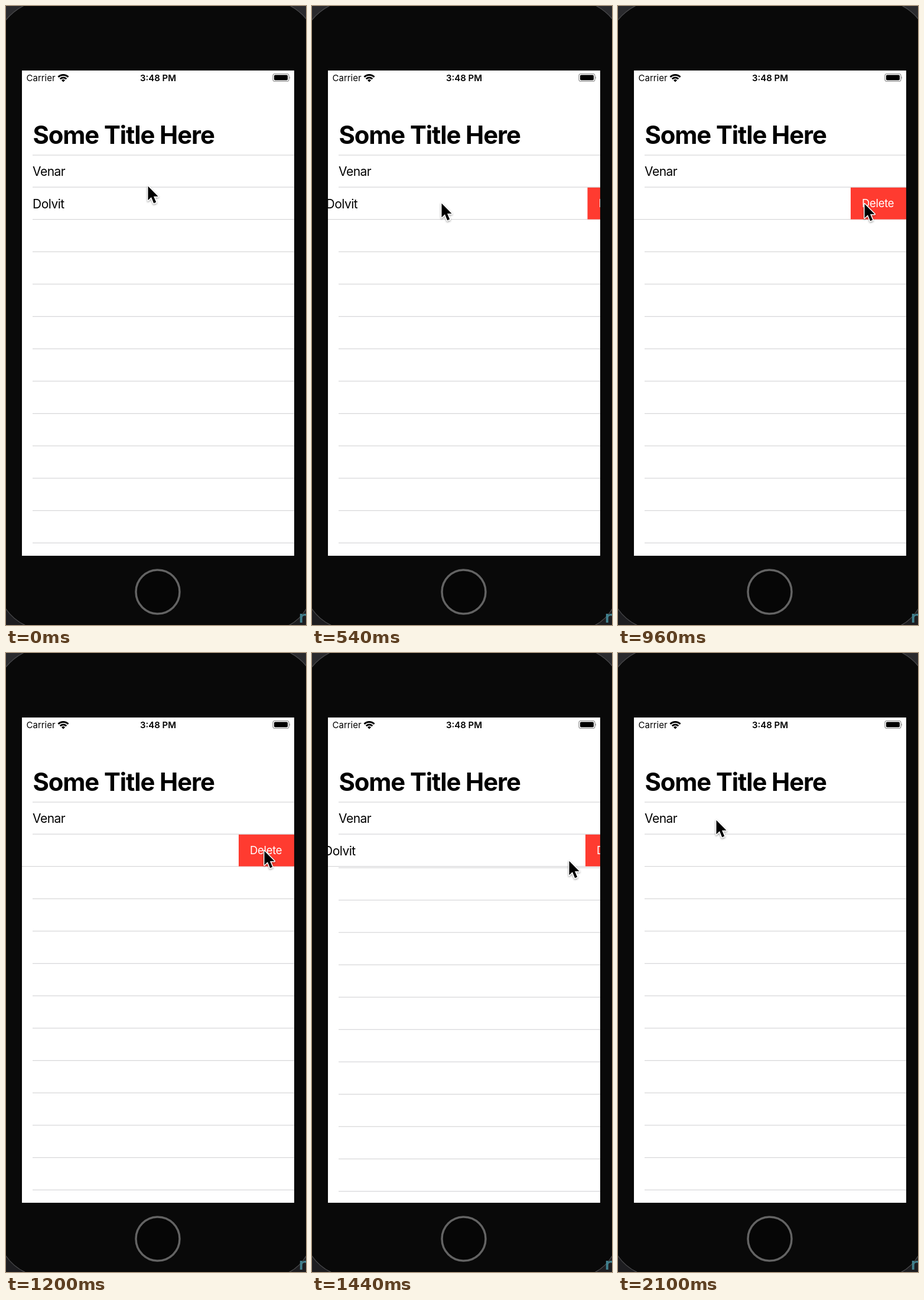
Animation of 508 by 1046 pixels, one loop 2280 ms. Source, as an HTML page:

```html
<!DOCTYPE html>
<html lang="en">
<head>
<meta charset="utf-8">
<title>Swipe to delete</title>
<style>
  html, body { margin: 0; width: 100%; height: 100%; overflow: hidden; background: #090909; }
  svg { display: block; width: 100%; height: 100%; font-family: Inter, "Liberation Sans", sans-serif; }
  .row-text { font-size: 21px; letter-spacing: -.5px; }
  .corner { stroke: #4a4a4c; stroke-width: 1.2; }
</style>
</head>
<body>
<svg viewBox="0 0 508 1046">
  <defs>
    <clipPath id="screen"><rect x="27" y="109" width="461" height="820"/></clipPath>
    <filter id="shadow" x="-50%" y="-50%" width="200%" height="200%">
      <feDropShadow dx="0" dy="1.5" stdDeviation="1.5" flood-opacity=".4"/>
    </filter>
  </defs>

  <!-- phone body -->
  <rect width="508" height="1046" fill="#090909"/>
  <g class="corner">
    <path fill="#2a2a2d" d="M-2 26Q12 8 33 -2H-2Z M510 24Q498 8 478 -2H510Z"/>
    <path fill="#1d1d20" d="M-2 1016Q12 1038 36 1048H-2Z M510 1016Q498 1038 476 1048H510Z"/>
  </g>
  <text x="494" y="1042" font-size="27" font-weight="700" fill="#41808d"
        font-family="'DejaVu Sans Mono', monospace">r</text>
  <circle cx="257" cy="990" r="37" fill="#060606" stroke="#636363" stroke-width="3.5"/>

  <g clip-path="url(#screen)">
    <rect x="27" y="109" width="461" height="820" fill="#fff"/>

    <!-- status bar -->
    <text x="34.5" y="127" font-size="15">Carrier</text>
    <text x="257.5" y="127" font-size="15" font-weight="600" text-anchor="middle">3:48 PM</text>
    <g transform="translate(97 128.5)">
      <path fill="none" stroke="#000" stroke-width="2.9"
            d="M-8.5 -8.5A12 12 0 0 1 8.5 -8.5 M-5.3 -5.3A7.5 7.5 0 0 1 5.3 -5.3"/>
      <path d="M0 0L-3 -3A4.3 4.3 0 0 1 3 -3Z"/>
    </g>
    <rect x="452" y="114.5" width="27" height="13" rx="3.5" fill="none" stroke="#8d8d8d" stroke-width="1.2"/>
    <rect x="454" y="116.5" width="23" height="9" rx="1.8"/>
    <path fill="#8d8d8d" d="M480 118.7Q482 121 480 123.3Z"/>

    <text x="45.5" y="233" font-size="41.8" font-weight="700" letter-spacing="-1.1">Some Title Here</text>

    <g id="lines" fill="#d6d6d8"></g>

    <!-- row being swiped away -->
    <g id="row">
      <rect x="27" y="307" width="461" height="54.2" fill="#fff"/>
      <g id="rowContent">
        <rect x="45" y="360" width="540" height="1.2" fill="#d6d6d8"/>
        <text class="row-text" x="45" y="342">Dolvit</text>
        <rect x="488" y="306.3" width="120" height="54.2" fill="#ff3b30"/>
        <text x="507" y="340" font-size="18.5" letter-spacing="-.3" fill="#fff">Delete</text>
      </g>
    </g>

    <g fill="#d6d6d8">
      <rect x="45" y="251.4" width="443" height="1.2"/>
      <rect x="45" y="305.5" width="443" height="1.2"/>
    </g>
    <text class="row-text" x="45" y="287">Venar</text>
  </g>

  <g id="cursor" filter="url(#shadow)">
    <path d="M1.5 2.5V26.2L7 21L11.2 31.2L15.2 29.5L11 19.7H18.6Z"
          stroke="#fff" stroke-width="3" stroke-linejoin="round" paint-order="stroke"/>
  </g>
</svg>

<script>
const LOOP = 2280, STEP = 60, ROW_HEIGHT = 54.67;
const $ = id => document.getElementById(id);

// Empty rows start with one spare line, which scrolls in from below on delete.
for (let i = 0; i < 12; i++) {
  const line = document.createElementNS($("lines").namespaceURI, "rect");
  const box = { x: 45, y: 414.7 + i * ROW_HEIGHT, width: 443, height: 1.2 };
  for (const name in box) line.setAttribute(name, box[name]);
  $("lines").append(line);
}

// Keys are [time, ...values].
const cursorKeys = [
  [60, 239, 302], [300, 247, 322], [420, 249, 332], [480, 244, 333], [540, 218, 331],
  [600, 139, 233], [660, 164, 241], [720, 222, 262], [840, 355, 314], [960, 416, 332],
  [1140, 436, 332], [1320, 436, 332], [1440, 434, 349], [1500, 424, 364],
  [1560, 395, 380], [1680, 305, 388], [1740, 291, 344], [1860, 239, 312], [2100, 165, 280]
];
const swipeKeys = [[480, 0], [540, 21.5], [600, 94], [1200, 94], [1527, 0]];
const ROW_GONE = 1540;

function valuesAt(keys, time) {
  const next = keys.findIndex(key => key[0] > time);
  if (next === 0) return keys[0].slice(1);
  if (next < 0) return keys[keys.length - 1].slice(1);
  const from = keys[next - 1], to = keys[next];
  const part = (time - from[0]) / (to[0] - from[0]);
  return from.slice(1).map((value, i) => value + (to[i + 1] - value) * part);
}

function easeBetween(start, end, time) {
  const u = Math.min(1, Math.max(0, (time - start) / (end - start)));
  return u * u * (3 - 2 * u);
}

const move = (id, x, y) => $(id).setAttribute("transform", `translate(${x} ${y})`);

function draw(now) {
  const time = Math.floor(now % LOOP / STEP) * STEP;
  move("cursor", ...valuesAt(cursorKeys, time));
  move("rowContent", -valuesAt(swipeKeys, time)[0], 0);
  move("lines", 0, -ROW_HEIGHT * easeBetween(1225, 1470, time));
  $("row").setAttribute("visibility", time < ROW_GONE ? "visible" : "hidden");
  requestAnimationFrame(draw);
}
draw(performance.now());
</script>
</body>
</html>
```
